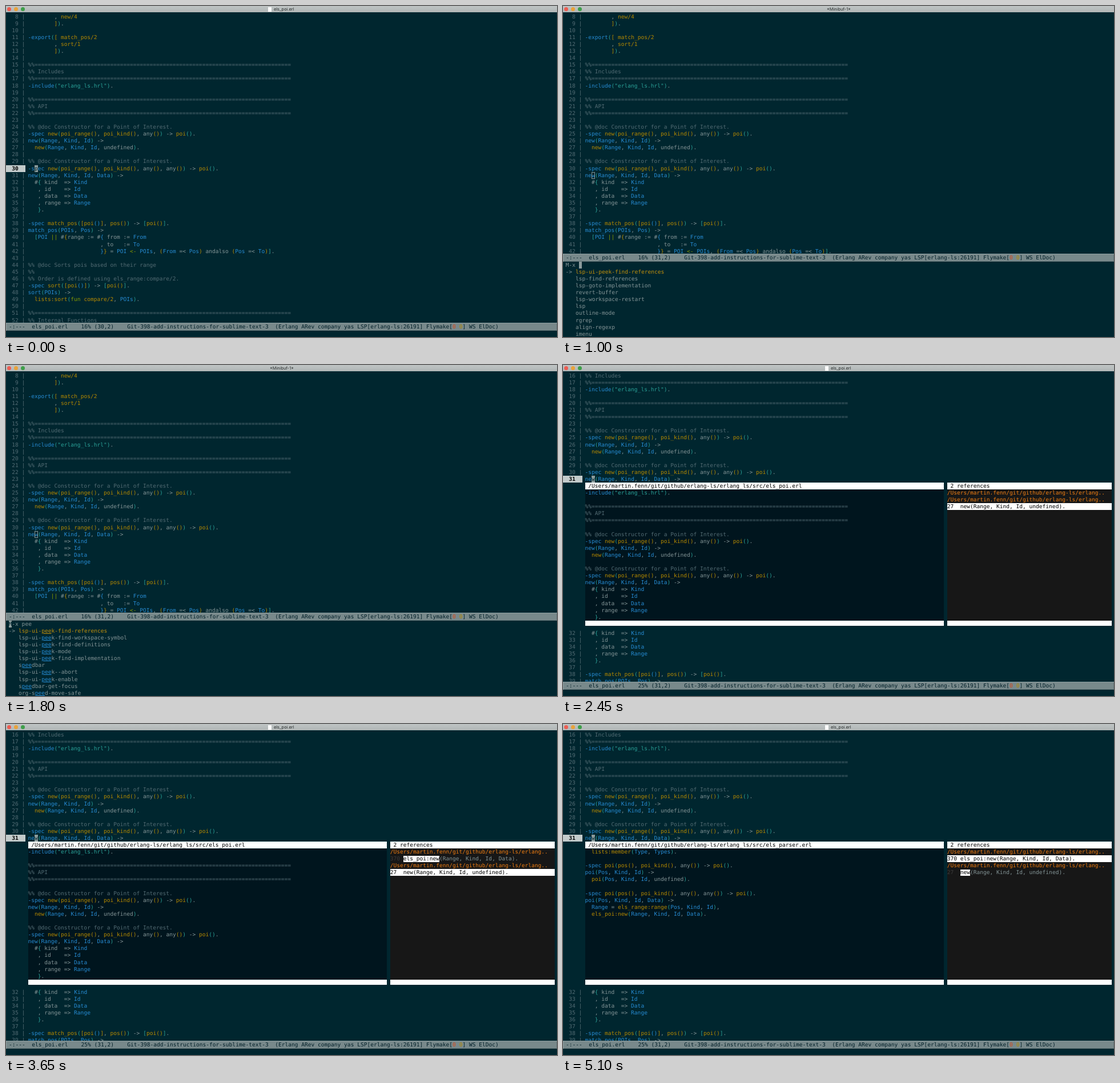
Animation of 965 by 580 pixels, one loop 5150 ms. Source, as an HTML page:

```html
<!DOCTYPE html>
<html lang="en">
<head>
<meta charset="utf-8">
<title>Editor: peek references</title>
<style>
  html, body { margin: 0; width: 100%; height: 100%; overflow: hidden; background: #00262f; }
  #stage {
    position: relative; width: 965px; height: 580px; overflow: hidden;
    background: #00262f; color: #839496;
    font: 9.576px/13.7px "DejaVu Sans Mono", "Liberation Mono", monospace;
    text-rendering: geometricPrecision; font-variant-ligatures: none;
  }
  #stage div { position: absolute; white-space: pre; }
  .row { height: 12.09px; }
  .note, .num { color: #526b73; }
  .str, .d1 { color: #2aa198; }
  .attr, .var, .def, .d3 { color: #268bd2; }
  .call, .d2 { color: #b58900; }
  .key { color: #859900; }
  .d4 { color: #6c71c4; }
  .pick { color: #c08f0c; }
  .match { color: #268bd2; text-decoration: underline; }
  .pick .match { color: inherit; }
  .here { background: #c3cbcb; color: #000; font-weight: bold; }
  .cursor { background: #8b9b9c; color: #00262f; }
  .hollow { box-shadow: inset 0 0 0 1px #839496; }
  .white { background: #fff; color: #000; }
  .file { color: #f07d10; }
  .dim { color: #3c3c3c; }
  .mode {
    left: 0; width: 965px; height: 14px; line-height: 15.5px; text-indent: 4.9px;
    background: #78898b; color: #001f28;
    box-shadow: inset 1px 1px #8d9c9e, inset -1px -1px #5f7073;
  }
  .err { color: #d8491c; }
  .warn { color: #b58900; }
  .title { left: 0; top: 0; width: 965px; height: 11px; background: linear-gradient(#bfc4c4, #b0b6b6); }
  .title div { font: 7.4px/11px Inter, "Open Sans", sans-serif; color: #2a2e2e; }
  .light { top: 2px; width: 7px; height: 7px; border-radius: 50%; }
  .icon { left: 459px; top: 1.5px; width: 6px; height: 8px; background: #fafafa; }
</style>
</head>
<body>
<div id="stage"></div>
<script>
const LOOP = 5150, W = 5.765, LH = 12.09, TOP = 12.6, EDGE = 4.6, TEXT = 38.5;
const RULE = '%%' + '='.repeat(78);
const FIRST = 8;

const MAIN = `        , new/4
        ]).

-export([ match_pos/2
        , sort/1
        ]).

${RULE}
%% Includes
${RULE}
-include("erlang_ls.hrl").

${RULE}
%% API
${RULE}

%% @doc Constructor for a Point of Interest.
-spec new(poi_range(), poi_kind(), any()) -> poi().
new(Range, Kind, Id) ->
  new(Range, Kind, Id, undefined).

%% @doc Constructor for a Point of Interest.
-spec new(poi_range(), poi_kind(), any(), any()) -> poi().
new(Range, Kind, Id, Data) ->
  #{ kind  => Kind
   , id    => Id
   , data  => Data
   , range => Range
   }.

-spec match_pos([poi()], pos()) -> [poi()].
match_pos(POIs, Pos) ->
  [POI || #{range := #{ from := From
                      , to   := To
                      }} = POI <- POIs, (From =< Pos) andalso (Pos =< To)].

%% @doc Sorts pois based on their range
%%
%% Order is defined using els_range:compare/2.
-spec sort([poi()]) -> [poi()].
sort(POIs) ->
  lists:sort(fun compare/2, POIs).

${RULE}
%% Internal Functions`;

const PARSER = `  lists:member(Type, Types).

-spec poi(pos(), poi_kind(), any()) -> poi().
poi(Pos, Kind, Id) ->
  poi(Pos, Kind, Id, undefined).

-spec poi(pos(), poi_kind(), any(), any()) -> poi().
poi(Pos, Kind, Id, Data) ->
  Range = els_range:range(Pos, Kind, Id),
  els_poi:new(Range, Kind, Id, Data).`;

const RECENT = `lsp-ui-peek-find-references
lsp-find-references
lsp-goto-implementation
revert-buffer
lsp-workspace-restart
lsp
outline-mode
rgrep
align-regexp
imenu`.split('\n');

const FOUND = `lsp-ui-peek-find-references
lsp-ui-peek-find-workspace-symbol
lsp-ui-peek-find-definitions
lsp-ui-peek-mode
lsp-ui-peek-find-implementation
speedbar
lsp-ui-peek--abort
lsp-ui-peek-enable
speedbar-get-focus
org-speed-move-safe`.split('\n');

const REPO = '/Users/martin.fenn/git/github/erlang-ls/erlang';

const esc = s => s.replace(/&/g, '&amp;').replace(/</g, '&lt;');
const span = (cls, s) => cls ? `<span class="${cls}">${esc(s)}</span>` : esc(s);

const TOKEN = /(?<note>%.*)|(?<str>"[^"]*")|(?<attr>^-\w+)|(?<var>[A-Z]\w*)|(?<word>[a-z]\w*(?::\w+)?(?:\/\d)?)|(?<open>[([{])|(?<close>[)\]}])|(?<key><-|\|\|)|./g;

function wordClass(word, at, next) {
  if (word === 'fun') return 'key';
  if (word === 'any') return '';
  if (at === 0) return 'def';
  return next === '(' || word.includes('/') ? 'call' : '';
}

// Colours Erlang code; bracket depth carries over from line to line.
function highlight(source, depth = 0) {
  return source.split('\n').map(line => line.replace(TOKEN, (s, ...rest) => {
    const g = rest.pop(), at = rest[rest.length - 2];
    if (g.open) return span('d' + ++depth, s);
    if (g.close) return span('d' + depth--, s);
    if (g.word) return span(wordClass(s, at, line[at + s.length]), s);
    return span(['note', 'str', 'attr', 'var', 'key'].find(k => g[k]), s);
  }));
}

const mainLines = highlight(MAIN, 2);
const parserLines = highlight(PARSER);

const rowTop = r => TOP + LH * r;
const box = (x, y, w, h, style) =>
  `<div style="left:${x}px;top:${y}px;width:${w}px;height:${h}px;${style}"></div>`;
const row = (x, r, html, cls = '', cols = 0) =>
  `<div class="row ${cls}" style="left:${x}px;top:${rowTop(r)}px;${cols ? `width:${cols * W}px` : ''}">${html}</div>`;

function buffer(from, to, r, here) {
  let out = '';
  for (let n = from; n <= to; n++, r++) {
    const num = String(n).padStart(3);
    out += n === here
      ? row(0, r, '', 'here', 34 / W) + row(EDGE, r, num, 'here')
      : row(EDGE, r, num + ' |', 'num');
    out += row(TEXT, r, mainLines[n - FIRST]);
  }
  return out;
}

const cursor = (x, r, ch, cls = 'cursor') => row(x, r, ch, cls, 1);

function titleBar(name, x, icon) {
  const lights = ['#ee5d52', '#e9a23b', '#3f9f4a']
    .map((c, i) => `<div class="light" style="left:${2.2 + 11.7 * i}px;background:${c}"></div>`).join('');
  return `<div class="title">${lights}${icon ? '<div class="icon"></div>' : ''}<div style="left:${x}px">${name}</div></div>`;
}
const fileTitle = titleBar('els_poi.erl', 469, true);

function modeLine(y, percent, line) {
  return box(0, y, 965, 580 - y, 'background:#00262f') +
    `<div class="mode" style="top:${y}px">-:---  els_poi.erl    ${percent}% (${line},2)    ` +
    'Git-398-add-instructions-for-sublime-text-3  (Erlang ARev company yas LSP[erlang-ls:26191] ' +
    'Flymake[<span class="err">0</span> <span class="warn">0</span>] WS ElDoc)</div>';
}

function editView({ line }, on) {
  const ch = line === 30 ? 'p' : 'w';
  return buffer(8, 52, 0, line) + (on ? cursor(TEXT + 2 * W, line - FIRST, ch) : '') +
    modeLine(555, 16, line) + fileTitle;
}

function miniView({ typed, home }, on) {
  const items = typed ? FOUND : RECENT;
  const mark = s => typed ? s.replace(typed, m => span('match', m)) : s;
  const list = items.map((s, i) =>
    row(EDGE, 37 + i, i ? '' : '->') + row(EDGE + 3 * W, 37 + i, mark(s), i ? '' : 'pick')).join('');
  const col = home ? 0 : 4 + typed.length;
  return buffer(8, 42, 0) + cursor(TEXT + 2 * W, 23, '', 'hollow') + modeLine(434, 16, 31) +
    row(EDGE, 36, 'M-x ' + typed) + (on ? cursor(EDGE + col * W, 36, home ? 'M' : '') : '') +
    list + titleBar('*Minibuf-1*', 462, false);
}

function reference(r, num, name, args, selected) {
  const x = TEXT + 110 * W, lead = String(num).padEnd(4);
  return selected
    ? row(x, r, lead + name + args, 'white', 50)
    : row(x, r, span('dim', lead) + span('white', name) + args);
}

function peekView({ file, open }, on) {
  const right = TEXT + 110 * W, inParser = file === 'els_parser';
  const lines = inParser ? parserLines : mainLines.slice(18 - FIRST, 37 - FIRST);
  const y = rowTop(17), h = rowTop(36) - y;
  let r = 17, refs = row(right, r++, REPO + '..', 'file');
  if (open) refs += reference(r++, 370, 'els_poi:new', '(Range, Kind, Id, Data).', inParser);
  refs += row(right, r++, REPO + '..', 'file');
  refs += reference(r, 27, 'new', '(Range, Kind, Id, undefined).', !inParser);
  return buffer(16, 31, 0, 31) + (on ? cursor(TEXT + 2 * W, 15, 'w') : '') +
    buffer(32, 39, 37.3) +
    box(TEXT, y, 109 * W, h, 'background:#00151e') + box(right, y, 50 * W, h, 'background:#171717') +
    box(TEXT, y + h, 109 * W, 9.3, 'background:#fff') + box(right, y + h, 50 * W, 9.3, 'background:#fff') +
    row(TEXT, 16, ` ${REPO}_ls/src/${file}.erl`, 'white', 109) + row(right, 16, ' 2 references', 'white', 50) +
    lines.map((s, i) => row(TEXT, 17 + i, s)).join('') + refs +
    modeLine(555, 25, 31) + fileTitle;
}

const STEPS = [
  [0, editView, { line: 30 }],
  [250, editView, { line: 31 }],
  [600, miniView, { typed: '' }],
  [1150, miniView, { typed: 'p' }],
  [1300, miniView, { typed: 'pe' }],
  [1450, miniView, { typed: 'pee' }],
  [1740, miniView, { typed: 'pee', home: true }],
  [2000, peekView, { file: 'els_poi' }],
  [2700, peekView, { file: 'els_parser', open: true }],
  [3500, peekView, { file: 'els_poi', open: true }],
  [4080, peekView, { file: 'els_parser', open: true }],
];

const stage = document.getElementById('stage');
let shown = '';

function frame(now) {
  const t = now % LOOP;
  const i = STEPS.findLastIndex(s => s[0] <= t);
  const [start, view, state] = STEPS[i];
  const on = (t - start) % 1000 < 500;   // the cursor blinks anew after each key
  const key = i + ':' + on;
  if (key !== shown) {
    stage.innerHTML = view(state, on);
    shown = key;
  }
  requestAnimationFrame(frame);
}
frame(performance.now());
</script>
</body>
</html>
```
